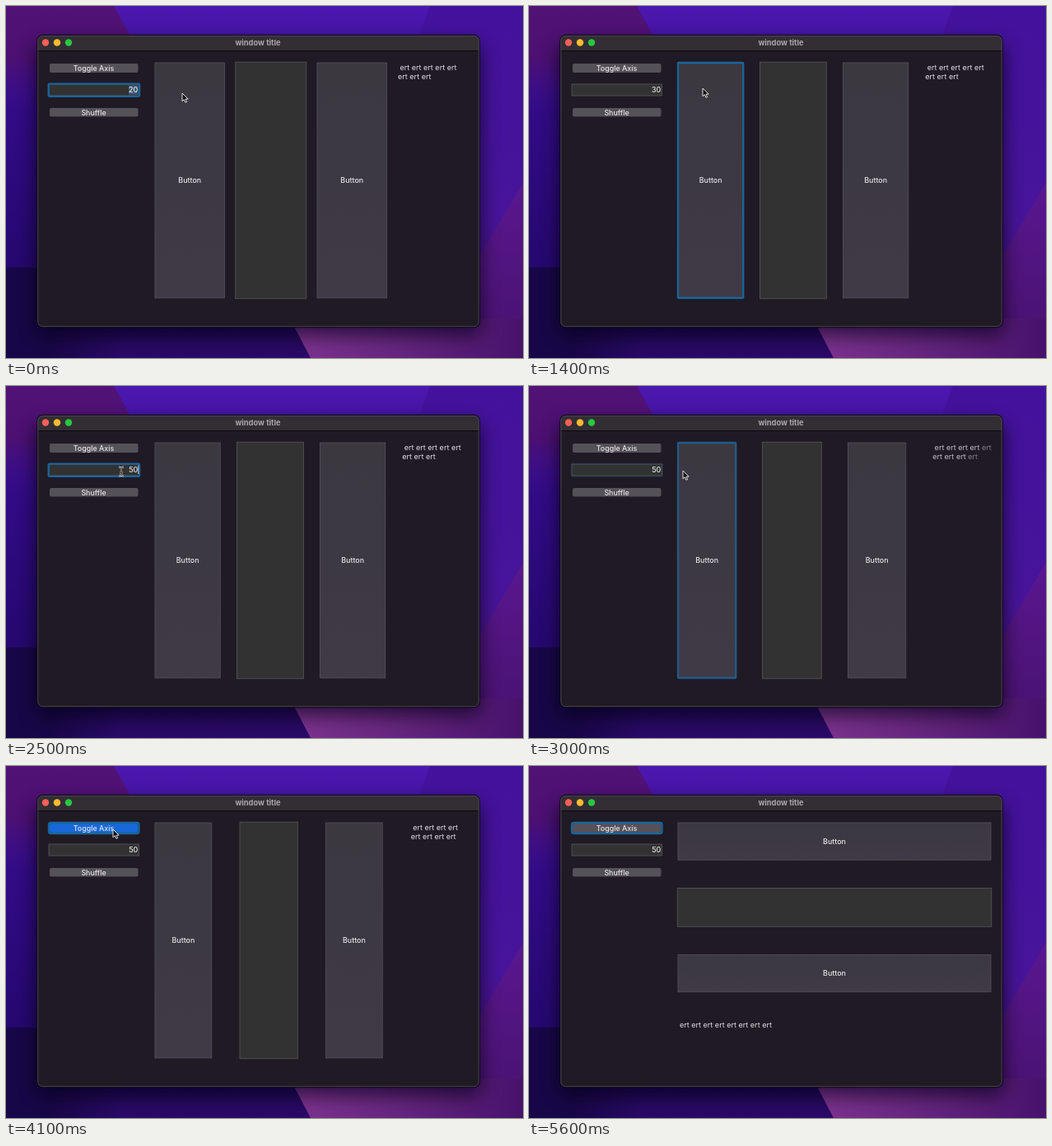
An HTML page for the animation above (5700 ms loop, 628x428 px).

```html
<!DOCTYPE html>
<html lang="en">
<head>
<meta charset="utf-8">
<title>window title</title>
<style>
  html, body { margin: 0; width: 100%; height: 100%; overflow: hidden; background: #220a60; }
  svg { display: block; width: 628px; height: 428px; }
  text { font: 500 8.9px Inter, Roboto, sans-serif; fill: #e6e4e8; }
  .mid { text-anchor: middle; }
  .title { font-weight: 700; font-size: 9.3px; fill: #aaa7ac; }
  .body { font-weight: 400; font-size: 9.05px; fill: #dfdde2; }
  .ring { fill: none; stroke: #19659c; stroke-width: 2.3; }
  .btn { fill: url(#face); stroke: #56525c; stroke-width: .8; }
  .ctl { fill: #555158; }
</style>
</head>
<body>
<svg viewBox="0 0 628 428">
  <defs>
    <linearGradient id="sky" x1="0" y1="0" x2="0" y2="1">
      <stop offset="0" stop-color="#4c18b0"/>
      <stop offset=".3" stop-color="#320b86"/>
      <stop offset=".72" stop-color="#260870"/>
      <stop offset=".9" stop-color="#22075a"/>
      <stop offset="1" stop-color="#2b0a68"/>
    </linearGradient>
    <linearGradient id="side" x1="0" y1="0" x2="0" y2="1">
      <stop offset="0" stop-color="#42129c"/>
      <stop offset=".6" stop-color="#47149a"/>
      <stop offset="1" stop-color="#47136f"/>
    </linearGradient>
    <linearGradient id="glow" x1="0" y1="0" x2="0" y2="1">
      <stop offset="0" stop-color="#591790"/>
      <stop offset="1" stop-color="#47126c"/>
    </linearGradient>
    <linearGradient id="pink" x1="0" y1="0" x2="1" y2="0">
      <stop offset="0" stop-color="#7d338f"/>
      <stop offset=".45" stop-color="#66267f"/>
      <stop offset="1" stop-color="#47126c"/>
    </linearGradient>
    <linearGradient id="plum" x1="0" y1="0" x2="0" y2="1">
      <stop offset="0" stop-color="#521276"/>
      <stop offset=".5" stop-color="#4b1072"/>
      <stop offset="1" stop-color="#380c7c" stop-opacity="0"/>
    </linearGradient>
    <linearGradient id="dusk" x1="0" y1="0" x2="1" y2="0">
      <stop offset="0" stop-color="#180748"/>
      <stop offset=".4" stop-color="#180748"/>
      <stop offset="1" stop-color="#180748" stop-opacity="0"/>
    </linearGradient>
    <linearGradient id="face" x1="0" y1="0" x2="0" y2="1">
      <stop offset="0" stop-color="#3b3840"/>
      <stop offset="1" stop-color="#3f3a45"/>
    </linearGradient>
    <filter id="soft" x="-20%" y="-20%" width="140%" height="140%">
      <feGaussianBlur stdDeviation="11"/>
    </filter>
  </defs>

  <rect width="628" height="428" fill="url(#sky)"/>
  <path d="M0 0H131L152 38L60 130H0Z" fill="url(#plum)"/>
  <path d="M0 318H38L140 360V428H0Z" fill="url(#dusk)"/>
  <path d="M515 0H628V428H560V60L500 40Z" fill="url(#side)"/>
  <path d="M628 215L560 330V428H628Z" fill="url(#glow)"/>
  <path d="M345 380H628V428H370Z" fill="url(#pink)"/>

  <rect x="36" y="46" width="541" height="354" rx="10" fill="#05020f" opacity=".65" filter="url(#soft)"/>
  <rect x="38" y="35.5" width="537" height="355" rx="6.5" fill="none" stroke="#0b0613" stroke-width="1.4"/>
  <rect x="38.5" y="36" width="536" height="354" rx="6" fill="#201a24"/>
  <path d="M38.5 54V42a6 6 0 0 1 6-6H568.5a6 6 0 0 1 6 6V54Z" fill="#322e34"/>
  <path d="M38.5 54.5H574.5" stroke="#0c090e"/>
  <rect x="38.8" y="36.3" width="535.4" height="353.4" rx="5.7" fill="none" stroke="#57515c" stroke-width=".8"/>
  <circle cx="48" cy="44.5" r="4.2" fill="#ff5f57"/>
  <circle cx="62" cy="44.5" r="4.2" fill="#febc2e"/>
  <circle cx="76" cy="44.5" r="4.2" fill="#28c840"/>
  <text class="mid title" x="306" y="47.8">window title</text>

  <rect id="toggle" class="ctl" x="53" y="70" width="107.5" height="11" rx="2"/>
  <rect id="toggleRing" class="ring" x="52" y="69" width="109.5" height="13" rx="2.5"/>
  <text class="mid" x="106.5" y="79.4">Toggle Axis</text>
  <rect x="52" y="95" width="109.5" height="14" fill="#323232" stroke="#59575b" stroke-width=".8"/>
  <rect id="mark" x="149" y="96.5" width="11.5" height="11" fill="#435a75"/>
  <rect id="fieldRing" class="ring" x="51.7" y="94.6" width="110.4" height="15.2" rx="1"/>
  <text id="value" x="160.3" y="104.6" text-anchor="end"></text>
  <rect id="caret" y="96.5" width=".8" height="10.5" fill="#e6e4e8"/>
  <rect class="ctl" x="53" y="124" width="107.5" height="10.5" rx="2"/>
  <text class="mid" x="106.5" y="133">Shuffle</text>

  <rect id="b0" class="btn"/>
  <rect id="b1" fill="#323232" stroke="#575757" stroke-width=".8"/>
  <rect id="b2" class="btn"/>
  <rect id="boxRing" class="ring" rx="1"/>
  <text id="l0" class="mid">Button</text>
  <text id="l2" class="mid">Button</text>
  <g id="words"></g>

  <path id="arrow" d="M0 0V9.8L2.3 7.7L3.9 11.3L5.6 10.6L4.1 7.1H7.2Z" fill="#111" stroke="#f4f2f5" stroke-width=".9" stroke-linejoin="round"/>
  <g id="beam" fill="none">
    <path d="M-3 -5.5Q0 -5.5 0 -3.5V3.5Q0 5.5 -3 5.5M3 -5.5Q0 -5.5 0 -3.5V3.5Q0 5.5 3 5.5M-1.7 1.5H1.7" stroke="#eee" stroke-width="2.1"/>
    <path d="M-3 -5.5Q0 -5.5 0 -3.5V3.5Q0 5.5 -3 5.5M3 -5.5Q0 -5.5 0 -3.5V3.5Q0 5.5 3 5.5M-1.7 1.5H1.7" stroke="#222" stroke-width=".8"/>
  </g>
</svg>
<script>
const LOOP = 5700, STEP = 100;
const AREA = { x: 181, y: 69, w: 380, h: 286 };
const SCALE = 0.7;

const $ = id => document.getElementById(id);
const set = (id, attrs) => {
  for (const k in attrs) $(id).setAttribute(k, attrs[k]);
};
const show = (id, a) => set(id, { opacity: a });
const mix = (a, b, p) => a + (b - a) * p;
const ramp = (t, start, len) => Math.min(1, Math.max(0, (t - start) / len));
const ease = (t, start, len) => {
  const p = ramp(t, start, len);
  return p * p * (3 - 2 * p);
};
const during = (t, a, b) => t >= a && t < b;

// Word counts per line for each way the label wraps
const wraps = [[5, 3], [4, 4], [8]].map(lines => {
  const g = document.createElementNS("http://www.w3.org/2000/svg", "g");
  lines.forEach((n, i) => {
    const line = document.createElementNS(g.namespaceURI, "text");
    line.setAttribute("class", "body");
    line.setAttribute("x", i ? -0.5 : 1.9);
    line.setAttribute("y", i * 11);
    line.textContent = Array(n).fill("ert").join(" ");
    g.append(line);
  });
  $("words").append(g);
  return g;
});

// Pointer stops: time, x, y
const stops = [
  [0, 214, 106], [900, 214, 106], [1100, 211, 100], [1450, 211, 100],
  [1800, 140, 104], [2500, 140, 104], [2800, 187, 103], [3300, 187, 103],
  [3800, 130, 77], [4850, 130, 77], [5300, -15, 92], [LOOP, -15, 92]
];

function pointer(t) {
  const i = stops.findIndex(s => s[0] > t);
  const [t0, x0, y0] = stops[i - 1], [t1, x1, y1] = stops[i];
  const p = ease(t, t0, t1 - t0);
  return [mix(x0, x1, p), mix(y0, y1, p)];
}

function cell(i, gap, turn) {
  const w = (AREA.w - 3 * gap) / 4, h = (AREA.h - 3 * gap) / 4;
  return {
    x: mix(AREA.x + i * (w + gap), AREA.x, turn),
    y: mix(AREA.y, AREA.y + i * (h + gap), turn),
    w: mix(w, AREA.w, turn),
    h: mix(AREA.h, h, turn)
  };
}

const place = (id, c, grow) => set(id, {
  x: c.x - grow, y: c.y - grow, width: c.w + 2 * grow, height: c.h + 2 * grow
});

function drawLayout(t) {
  const widen = ease(t, 2810, 250), turn = ease(t, 4310, 380);
  const rewrap = ramp(t, 2850, 300);
  const gap = SCALE * (20 + 10 * ease(t, 1100, 250) + 20 * widen);
  const cells = [0, 1, 2, 3].map(i => cell(i, gap, turn));
  cells.slice(0, 3).forEach((c, i) => place("b" + i, c, i === 1 ? 0.8 : 0));
  place("boxRing", cells[0], 0);
  for (const i of [0, 2]) {
    const c = cells[i];
    set("l" + i, { x: c.x + c.w / 2, y: c.y + c.h / 2 + 3.3 });
  }
  const c = cells[3];
  set("words", { transform: `translate(${c.x} ${c.y + mix(9, 8, turn)})` });
  [1 - rewrap, rewrap * (1 - turn), turn].forEach((a, i) => wraps[i].setAttribute("opacity", a));
}

function drawControls(t) {
  const fade = start => ramp(t, start, 250);
  show("fieldRing", 1 - fade(1100) + fade(1850) - fade(2800));
  show("boxRing", fade(1100) - fade(1850) + fade(2800) - fade(3800));
  show("toggleRing", fade(3800));
  $("toggle").style.fill = during(t, 3900, 4300) ? "#1768d8" : "";

  const value = t < 400 ? "20" : t < 500 ? "3" : t < 2400 ? "30" : t < 2500 ? "5" : "50";
  $("value").textContent = value;
  show("mark", t < 400 || during(t, 2200, 2400) ? 1 : 0);
  show("caret", during(t, 400, 1100) || during(t, 1900, 2200) || during(t, 2400, 2800) ? 1 : 0);
  set("caret", { x: during(t, 1900, 2200) ? 148 : 160.4 });
}

function drawPointer(t) {
  const [x, y] = pointer(t);
  const inField = x > 52 && x < 161 && y > 95 && y < 109;
  show("arrow", inField ? 0 : 1);
  show("beam", inField ? 1 : 0);
  for (const id of ["arrow", "beam"]) set(id, { transform: `translate(${x} ${y})` });
}

function draw(t) {
  drawLayout(t);
  drawControls(t);
  drawPointer(t);
}

const began = performance.now();
function tick() {
  const t = (performance.now() - began) % LOOP;
  draw(Math.floor(t / STEP) * STEP);
  requestAnimationFrame(tick);
}
tick();
</script>
</body>
</html>
```
